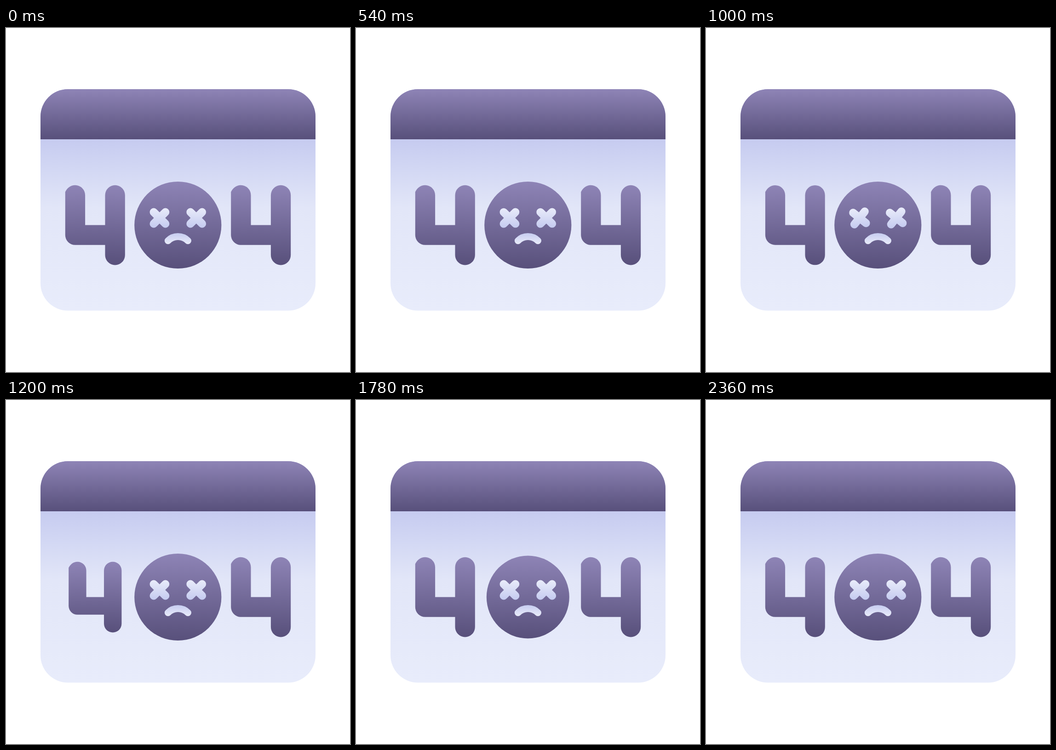
Animation of 748 by 748 pixels, one loop 2400 ms. Source, as an HTML page:

```html
<!DOCTYPE html>
<html lang="en">
<head>
<meta charset="utf-8">
<title>404</title>
<style>
  html, body { margin: 0; width: 100%; height: 100%; overflow: hidden; background: #fff; }
  svg { display: block; width: 100vw; height: 100vh; }
</style>
</head>
<body>
<svg viewBox="0 0 748 748">
  <defs>
    <linearGradient id="bar" gradientUnits="userSpaceOnUse" x1="0" y1="133" x2="0" y2="242">
      <stop stop-color="#8e84b6"/><stop offset="1" stop-color="#58507b"/>
    </linearGradient>
    <linearGradient id="body" gradientUnits="userSpaceOnUse" x1="0" y1="242" x2="0" y2="614">
      <stop stop-color="#c6cbf0"/><stop offset=".2" stop-color="#d4d9f4"/>
      <stop offset=".4" stop-color="#e2e6f8"/><stop offset="1" stop-color="#e8ecfb"/>
    </linearGradient>
    <linearGradient id="ink" x1="0" y1="0" x2="0" y2="1">
      <stop stop-color="#8e84b6"/><stop offset="1" stop-color="#58507b"/>
    </linearGradient>
    <linearGradient id="eyeFill" gradientUnits="userSpaceOnUse" x1="0" y1="-21.5" x2="0" y2="21.5">
      <stop stop-color="#e9ecfa"/><stop offset="1" stop-color="#c5cbf0"/>
    </linearGradient>
    <linearGradient id="mouthFill" gradientUnits="userSpaceOnUse" x1="0" y1="446" x2="0" y2="470">
      <stop stop-color="#c6ccf0"/><stop offset="1" stop-color="#e9ecfa"/>
    </linearGradient>
    <clipPath id="card"><rect x="75" y="133" width="598" height="481.5" rx="59.5"/></clipPath>
    <path id="four" d="M-65 22V-72C-60.500 -81 -53 -86.700 -43.400 -86.700A21.700 21.700 0 0 1 -21.700 -65V0H21.700V-65A21.650 21.650 0 0 1 65 -65V65.300A21.650 21.650 0 0 1 21.700 65.300V43.300H-43.400A21.600 21.600 0 0 1 -65 21.700Z" fill="url(#ink)"/>
    <path id="cross" d="M-12.700 -12.700L12.700 12.700M12.700 -12.700L-12.700 12.700" fill="none" stroke="url(#eyeFill)" stroke-width="17.4" stroke-linecap="round"/>
  </defs>
  <g clip-path="url(#card)">
    <rect x="75" y="133" width="598" height="482" fill="url(#body)"/>
    <rect x="75" y="133" width="598" height="109" fill="url(#bar)"/>
  </g>
  <use href="#four" class="pulse" data-x="193.8"/>
  <circle r="94.6" fill="url(#ink)" class="pulse" data-x="373.8"/>
  <use href="#four" class="pulse" data-x="554.2"/>
  <use href="#cross" class="eye" data-x="333.9"/>
  <use href="#cross" class="eye" data-x="413.7"/>
  <path d="M352.300 462.500A30.700 30.700 0 0 1 395.500 462.500" fill="none" stroke="url(#mouthFill)" stroke-width="15" stroke-linecap="round"/>
</svg>
<script>
  const LOOP = 2400;
  const pulses = [...document.querySelectorAll('.pulse')];
  const eyes = [...document.querySelectorAll('.eye')];
  const turnKeys = [[0, 0], [270, 30], [810, -30], [1080, 0]];

  const ease = x => {
    x = Math.min(1, Math.max(0, x));
    return x * x * (3 - 2 * x);
  };

  function tween(keys, t) {
    let value = keys[0][1];
    for (let i = 1; i < keys.length; i++) {
      const [t0, a] = keys[i - 1], [t1, b] = keys[i];
      value += (b - a) * ease((t - t0) / (t1 - t0));
    }
    return value;
  }

  // Each part shrinks and recovers in turn, slightly overlapping the next.
  function scaleAt(t, i) {
    const start = 985 + 405 * i, half = 250;
    return 1 - 0.12 * ease(1 - Math.abs(t - start - half) / half);
  }

  function draw(t) {
    pulses.forEach((el, i) =>
      el.setAttribute('transform', `translate(${el.dataset.x} 428.5) scale(${scaleAt(t, i)})`));
    const turn = tween(turnKeys, t);
    eyes.forEach(el =>
      el.setAttribute('transform', `translate(${el.dataset.x} 413) rotate(${turn})`));
  }

  const begin = performance.now();
  function tick() {
    draw((performance.now() - begin) % LOOP);
    requestAnimationFrame(tick);
  }
  draw(0);
  requestAnimationFrame(tick);
</script>
</body>
</html>
```
